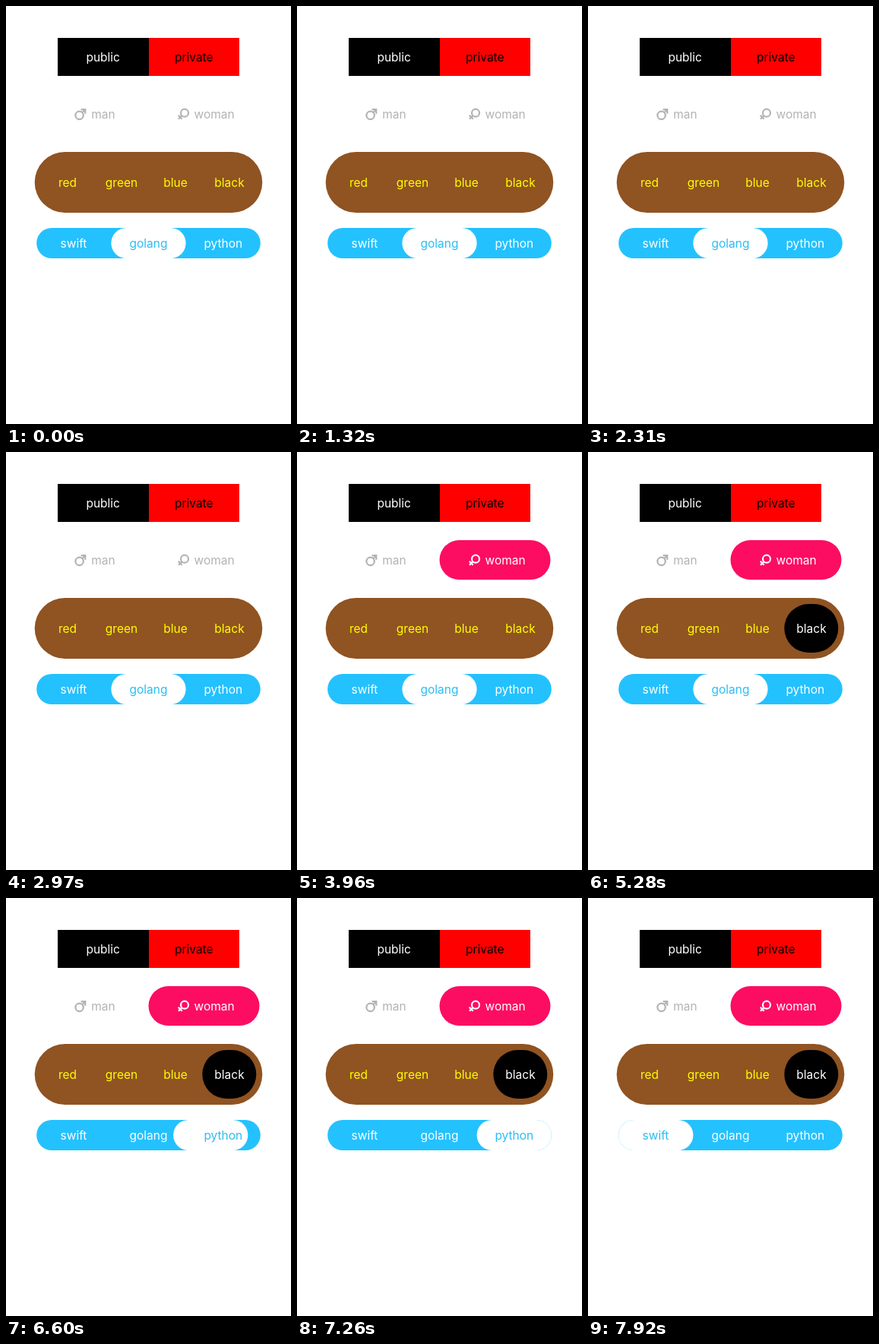
An HTML page that plays this animation: 375x550 px, repeating every 8 s.

```html
<!DOCTYPE html>
<html lang="en">
<head>
<meta charset="utf-8">
<title>Segmented controls</title>
<style>
  html, body { margin: 0; width: 100%; height: 100%; overflow: hidden; background: #fff; }
  svg { display: block; width: 375px; height: 550px; }
  text { font: 15.5px Inter, "Open Sans", sans-serif; fill: currentColor; }
  .mid { text-anchor: middle; }
  .icon { fill: none; stroke: currentColor; stroke-width: 2.2; }
</style>
</head>
<body>
<svg viewBox="0 0 375 550">
  <defs>
    <g id="languages" class="mid">
      <text x="89" y="317.5">swift</text>
      <text x="187.5" y="317.5">golang</text>
      <text x="285.8" y="317.5">python</text>
    </g>
    <clipPath id="thumbClip"><rect class="thumb" y="292" width="98.2" height="40" rx="20"/></clipPath>
  </defs>

  <path d="M68 42h120v50H68z"/>
  <path d="M188 42h119v50H188z" fill="#f00"/>
  <g class="mid">
    <text x="127.7" y="72.5" color="#fff">public</text>
    <text x="247.3" y="72.5" color="#000">private</text>
  </g>

  <g color="#b3b3b3">
    <g class="icon">
      <circle cx="96.6" cy="143.9" r="5.2"/>
      <path d="M100.3 140.2l3.7-3.7M98.6 136.1h5.7v5.7"/>
    </g>
    <text x="112.3" y="147.5">man</text>
  </g>
  <rect id="womanPill" x="187.5" y="116" width="146" height="52" rx="26" fill="#fc0d62"/>
  <g id="woman">
    <g class="icon">
      <circle cx="235" cy="140.7" r="5"/>
      <path d="M231.4 144.3l-4.4 4.4M226.7 143.8l5 5"/>
    </g>
    <text x="247.5" y="147.5">woman</text>
  </g>

  <rect x="37.7" y="192" width="299.6" height="80" rx="40" fill="#905322"/>
  <rect id="blackPill" x="258.3" y="200" width="71" height="64" rx="32"/>
  <g class="mid" color="#ff0">
    <text x="81" y="237.5">red</text>
    <text x="152" y="237.5">green</text>
    <text x="223" y="237.5">blue</text>
    <text id="black" x="294" y="237.5">black</text>
  </g>

  <rect x="40.2" y="292" width="294.6" height="40" rx="20" fill="#24c1ff"/>
  <use href="#languages" color="#fff"/>
  <rect class="thumb" y="292" width="98.2" height="40" rx="20" fill="#fff"/>
  <g clip-path="url(#thumbClip)"><use href="#languages" color="#2bbdf2"/></g>
</svg>
<script>
  const LOOP = 8000, STEP = 330, SLIDE = 300, SEGMENT = 98.2;
  const byId = id => document.getElementById(id);
  const thumbs = document.querySelectorAll('.thumb');

  function ease(time, start) {
    const p = Math.min(1, Math.max(0, (time - start) / SLIDE));
    return p * p * (3 - 2 * p);
  }

  function select(id, on, offColor) {
    byId(id + 'Pill').setAttribute('visibility', on ? 'visible' : 'hidden');
    byId(id).setAttribute('color', on ? '#fff' : offColor);
  }

  function draw(now) {
    // The picture advances in held steps, like a low-rate screen recording.
    const time = Math.floor((now % LOOP) / STEP) * STEP;
    select('woman', time >= 3960, '#b3b3b3');
    select('black', time >= 4950, '#ff0');
    const index = 1 + ease(time, 6378) - 2 * ease(time, 7568);
    thumbs.forEach(thumb => thumb.setAttribute('x', 40.2 + SEGMENT * index));
  }

  const begin = performance.now();
  function tick() {
    draw(performance.now() - begin);
    requestAnimationFrame(tick);
  }
  tick();
</script>
</body>
</html>
```
